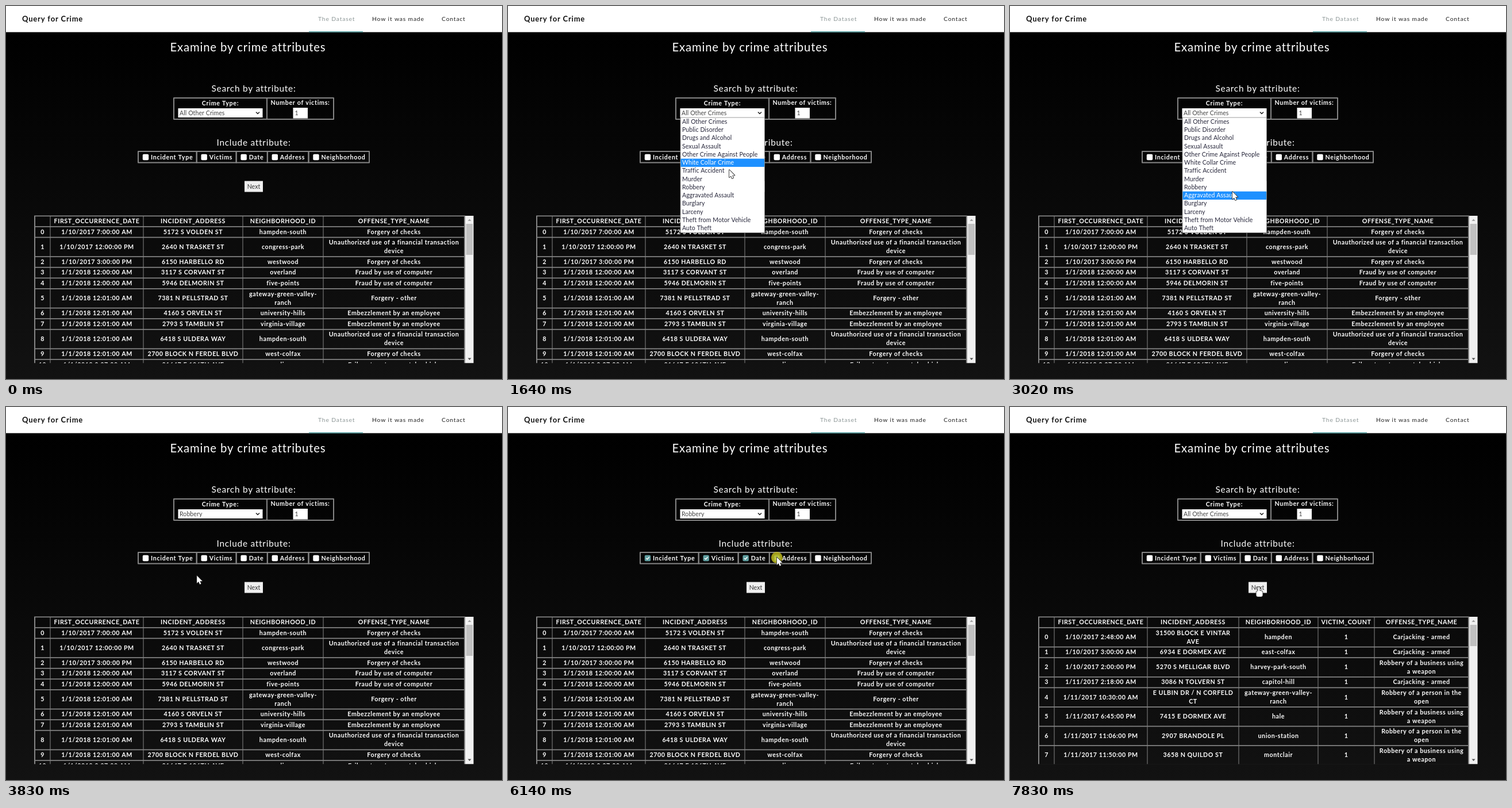
Write an HTML page with a canvas that moves like this. It is 863x649 px and loops after 8000 ms.

```html
<!DOCTYPE html>
<html lang="en">
<head>
<meta charset="utf-8">
<title>Query for Crime</title>
<style>
html, body { margin: 0; width: 100%; height: 100%; overflow: hidden; background: #000; }
canvas { display: block; }
</style>
</head>
<body>
<canvas id="stage" width="863" height="649"></canvas>
<script>
const ctx = document.getElementById('stage').getContext('2d');
const LOOP = 8000, ENTER = 120, OPEN = 700, PICK = 3490, RELOAD = 7700;
const CENTER = 431, GRAY = '#858585', TEAL = '#5f9ea0';

// weight, size, tracking
const STYLES = {
  brand: ['bold', 13, 0.8],
  nav: ['normal', 10.3, 0.85],
  title: ['normal', 20.3, 0.85],
  heading: ['normal', 15.4, 0.75],
  label: ['bold', 10.7, 0.7],
  cell: ['bold', 10.7, 0.55],
  field: ['normal', 10.5, 0.1]
};

const CRIMES = ['All Other Crimes', 'Public Disorder', 'Drugs and Alcohol', 'Sexual Assault',
  'Other Crime Against People', 'White Collar Crime', 'Traffic Accident', 'Murder', 'Robbery',
  'Aggravated Assault', 'Burglary', 'Larceny', 'Theft from Motor Vehicle', 'Auto Theft'];
const LIST = { x: 300, top: 194, width: 146.5, row: 14.25 };

// Cells are split by "|", lines within a cell by "~".
const FRAUD = {
  columns: [50, 77, 239, 412, 552, 798],
  thumb: 54,
  rows: [
    'FIRST_OCCURRENCE_DATE|INCIDENT_ADDRESS|NEIGHBORHOOD_ID|OFFENSE_TYPE_NAME',
    '1/10/2017 7:00:00 AM|5172 S VOLDEN ST|hampden-south|Forgery of checks',
    '1/10/2017 12:00:00 PM|2640 N TRASKET ST|congress-park|Unauthorized use of a financial transaction~device',
    '1/10/2017 3:00:00 PM|6150 HARBELLO RD|westwood|Forgery of checks',
    '1/1/2018 12:00:00 AM|3117 S CORVANT ST|overland|Fraud by use of computer',
    '1/1/2018 12:00:00 AM|5946 DELMORIN ST|five-points|Fraud by use of computer',
    '1/1/2018 12:01:00 AM|7381 N PELLSTRAD ST|gateway-green-valley-~ranch|Forgery - other',
    '1/1/2018 12:01:00 AM|4160 S ORVELN ST|university-hills|Embezzlement by an employee',
    '1/1/2018 12:01:00 AM|2793 S TAMBLIN ST|virginia-village|Embezzlement by an employee',
    '1/1/2018 12:01:00 AM|6418 S ULDERA WAY|hampden-south|Unauthorized use of a financial transaction~device',
    '1/1/2018 12:01:00 AM|2700 BLOCK N FERDEL BLVD|west-colfax|Forgery of checks',
    '1/1/2018 3:37:00 AM|31647 E 196TH AVE|dia|Failure to return rental vehicle'
  ]
};
const ROBBERY = {
  columns: [50, 77, 239, 398, 536, 634, 798],
  thumb: 37,
  rows: [
    'FIRST_OCCURRENCE_DATE|INCIDENT_ADDRESS|NEIGHBORHOOD_ID|VICTIM_COUNT|OFFENSE_TYPE_NAME',
    '1/10/2017 2:48:00 AM|31500 BLOCK E VINTAR~AVE|hampden|1|Carjacking - armed',
    '1/10/2017 3:00:00 AM|6934 E DORMEX AVE|east-colfax|1|Carjacking - armed',
    '1/10/2017 2:00:00 PM|5270 S MELLIGAR BLVD|harvey-park-south|1|Robbery of a business using~a weapon',
    '1/11/2017 2:18:00 AM|3086 N TOLVERN ST|capitol-hill|1|Carjacking - armed',
    '1/11/2017 10:30:00 AM|E ULBIN DR / N CORFELD~CT|gateway-green-valley-~ranch|1|Robbery of a person in the~open',
    '1/11/2017 6:45:00 PM|7415 E DORMEX AVE|hale|1|Robbery of a business using~a weapon',
    '1/11/2017 11:06:00 PM|2907 BRANDOLE PL|union-station|1|Robbery of a person in the~open',
    '1/11/2017 11:50:00 PM|3658 N QUILDO ST|montclair|1|Robbery of a business using~a weapon'
  ]
};

function setFont(style) {
  const [weight, size, tracking] = STYLES[style];
  ctx.font = `${weight} ${size}px Lato, "Open Sans", sans-serif`;
  ctx.letterSpacing = tracking + 'px';
  return size;
}

function text(str, x, y, style, color = '#fff', align = 'left') {
  const size = setFont(style);
  ctx.textAlign = align;
  ctx.fillStyle = color;
  ctx.fillText(str, x, y + size * 0.355);
}

function centered(str, x, y, style, color) {
  text(str, x, y, style, color, 'center');
}

function box(x, y, w, h, fill) {
  ctx.fillStyle = fill;
  ctx.fillRect(x, y, w, h);
}

function frame(x, y, w, h, width = 2) {
  ctx.strokeStyle = GRAY;
  ctx.lineWidth = width;
  ctx.strokeRect(x, y, w, h);
}

function paint(path, fill, stroke, width = 1) {
  ctx.lineJoin = 'round';
  if (stroke) {
    ctx.strokeStyle = stroke;
    ctx.lineWidth = width;
    ctx.stroke(path);
  }
  if (fill) {
    ctx.fillStyle = fill;
    ctx.fill(path);
  }
}

function rounded(x, y, w, h, r) {
  const path = new Path2D();
  path.roundRect(x, y, w, h, r);
  return path;
}

// A "v" of half width r; a negative depth points it upwards.
function chevron(x, y, r, depth) {
  return new Path2D(`M${x - r} ${y}l${r} ${depth}l${r} ${-depth}`);
}

// Each cell is as wide as its label plus checkbox and padding; ticks follow at an even pace.
function layAttributes() {
  let left = 230;
  setFont('label');
  return ['Incident Type', 'Victims', 'Date', 'Address', 'Neighborhood'].map((label, i) => {
    const cell = { label, left, width: ctx.measureText(label).width + 28.4, time: 4640 + i * 490 };
    left += cell.width;
    return cell;
  });
}
const ATTRIBUTES = layAttributes();

// time, x, y of the pointer tip
const PATH = [
  [ENTER, 708, 420], [530, 402, 192], [630, 384, 182], [950, 384, 183],
  [1640, 385, 285], [2600, 388, 345], [3020, 387, 323], [3360, 386, 315], [3560, 386, 315],
  [4250, 249, 260],
  ...ATTRIBUTES.flatMap(({ left, time }) =>
    [time - 80, time + 100].map(t => [t, left + 13, 261.5])),
  [7010, 541, 264], [7220, 447, 307], [7400, 433, 314]
];
const CLICKS = [700, PICK, 7460, ...ATTRIBUTES.map(a => a.time)];

function drawPage() {
  const shade = ctx.createLinearGradient(0, 45, 0, 649);
  shade.addColorStop(0, '#000');
  shade.addColorStop(1, '#121212');
  box(0, 0, 863, 649, shade);
  box(0, 0, 863, 45.5, '#fff');
  box(527, 44, 94, 2, TEAL);
  text('Query for Crime', 28, 22.5, 'brand', '#111');
  text('The Dataset', 543, 22.5, 'nav', '#8d9797');
  text('How it was made', 637, 22.5, 'nav', '#222');
  text('Contact', 758, 22.5, 'nav', '#222');
  centered('Examine by crime attributes', CENTER - 10, 71.5, 'title');
  centered('Search by attribute:', CENTER, 143.5, 'heading');
  centered('Include attribute:', CENTER, 238, 'heading');
}

function drawSearch(crime) {
  frame(292, 160, 278, 37);
  box(453, 160, 2, 37, GRAY);
  centered('Crime Type:', 373, 169.5, 'label');
  centered('Number of victims:', 512, 168.5, 'label');
  box(299.5, 178, 147, 16, '#fff');
  text(crime, 302, 186, 'field', '#444');
  paint(chevron(438, 184.5, 3, 3), null, '#222', 1.6);
  box(499.5, 177, 25.5, 18.5, '#fff');
  text('1', 502.5, 186, 'field', '#444');
}

function drawCheckbox(x, y, checked, pressed, focused) {
  if (focused) paint(rounded(x - 6.5, y - 6.5, 13, 13, 3), '#000', '#b9cccc');
  const fill = checked ? TEAL : pressed ? '#b5b5b5' : '#fff';
  paint(rounded(x - 5.2, y - 5.2, 10.4, 10.4, 2), fill);
  if (checked) paint(new Path2D(`M${x - 2.7} ${y}l2 2l3.5 -4`), null, '#fff', 1.5);
}

function drawAttributes(t) {
  const live = t < RELOAD, y = 263;
  const latest = ATTRIBUTES.filter(a => t >= a.time).length - 1;
  ATTRIBUTES.forEach(({ label, left, width, time }, i) => {
    frame(left, 253, width, 19.5);
    const pressed = live && t >= time - 70;
    drawCheckbox(left + 13, y, live && t >= time, pressed, live && i === latest);
    text(label, left + 22, y, 'label');
  });
  box(CENTER - 16, 304.5, 32, 19, '#efefef');
  centered('Next', CENTER, 314, 'field', '#333');
}

function drawTable({ columns, rows, thumb }) {
  const left = columns[0], right = columns[columns.length - 1];
  const LINE = 15, TOP = 365, HEIGHT = 256.5;
  const rule = y => box(left - 1, y - 0.5, right - left + 2, 1.7, GRAY);
  ctx.save();
  ctx.beginPath();
  ctx.rect(48, TOP - 1, 766, HEIGHT + 1);
  ctx.clip();
  let top = TOP;
  rows.forEach((row, r) => {
    const cells = [r ? String(r - 1) : '', ...row.split('|')].map(cell => cell.split('~'));
    const height = 3.6 + LINE * Math.max(...cells.map(lines => lines.length));
    cells.forEach((lines, i) => lines.forEach((line, n) => {
      const y = top + height / 2 + (n - (lines.length - 1) / 2) * LINE;
      centered(line, (columns[i] + columns[i + 1]) / 2, y, 'cell');
    }));
    rule(top);
    top += height;
  });
  rule(top);
  columns.forEach(x => {
    const width = x === left || x === right ? 2 : 1;
    box(x - width / 2, TOP, width, HEIGHT, GRAY);
  });
  box(799, TOP, 14.5, HEIGHT, '#f1f1f1');
  box(800.5, 379, 11.5, thumb, '#c1c1c1');
  paint(chevron(806.5, 374, 3, -3.5), '#a0a0a0');
  paint(chevron(806.5, 612.5, 3, 3.5), '#505050');
  ctx.restore();
}

function drawList(active) {
  const { x, top, width, row } = LIST;
  box(x, top, width, row * CRIMES.length + 1, '#fff');
  frame(x, top, width, row * CRIMES.length + 1, 0.8);
  CRIMES.forEach((crime, i) => {
    const y = top + i * row, on = i === active;
    if (on) box(x + 0.5, y + 0.4, width - 1, row, '#1e90ff');
    text(crime, x + 3, y + 7.2, 'field', on ? '#fff' : '#26263a');
  });
}

function pointerAt(t) {
  const next = PATH.findIndex(p => p[0] > t);
  if (next < 0) return PATH[PATH.length - 1].slice(1);
  const [t0, x0, y0] = PATH[Math.max(0, next - 1)], [t1, x1, y1] = PATH[next];
  const k = t1 > t0 ? (t - t0) / (t1 - t0) : 0;
  return [x0 + (x1 - x0) * k, y0 + (y1 - y0) * k];
}

function drawPointer(t) {
  if (t < ENTER) return;
  const [x, y] = pointerAt(t);
  if (CLICKS.some(click => Math.abs(t - click) <= 75)) {
    ctx.beginPath();
    ctx.arc(x, y + 0.5, 10, 0, Math.PI * 2);
    ctx.fillStyle = 'rgba(205, 200, 25, 0.75)';
    ctx.fill();
  }
  ctx.save();
  ctx.translate(x, y);
  if (x < CENTER + 16 && y > 304.5 && t > PICK) {
    const hand = rounded(-1.5, -1, 3, 11, 1.5);
    hand.roundRect(-4.5, 6, 11, 10, 3);
    paint(hand, '#fff', '#222', 1.6);
  } else {
    paint(new Path2D('M0 0V13.2L3 10.4L5 15L7.2 14L5.2 9.6H9.4Z'), '#fff', '#222', 1.6);
  }
  ctx.restore();
}

function draw(t) {
  const robbery = t >= PICK && t < RELOAD;
  drawPage();
  drawSearch(robbery ? 'Robbery' : CRIMES[0]);
  drawAttributes(t);
  drawTable(t < RELOAD ? FRAUD : ROBBERY);
  if (t >= OPEN && t < PICK) {
    // The highlight trails the pointer slightly.
    const y = pointerAt(t - 70)[1];
    drawList(Math.max(0, Math.floor((y - LIST.top) / LIST.row)));
  }
  drawPointer(t);
}

const start = performance.now();
function tick() {
  draw((performance.now() - start) % LOOP);
  requestAnimationFrame(tick);
}
tick();
</script>
</body>
</html>
```
